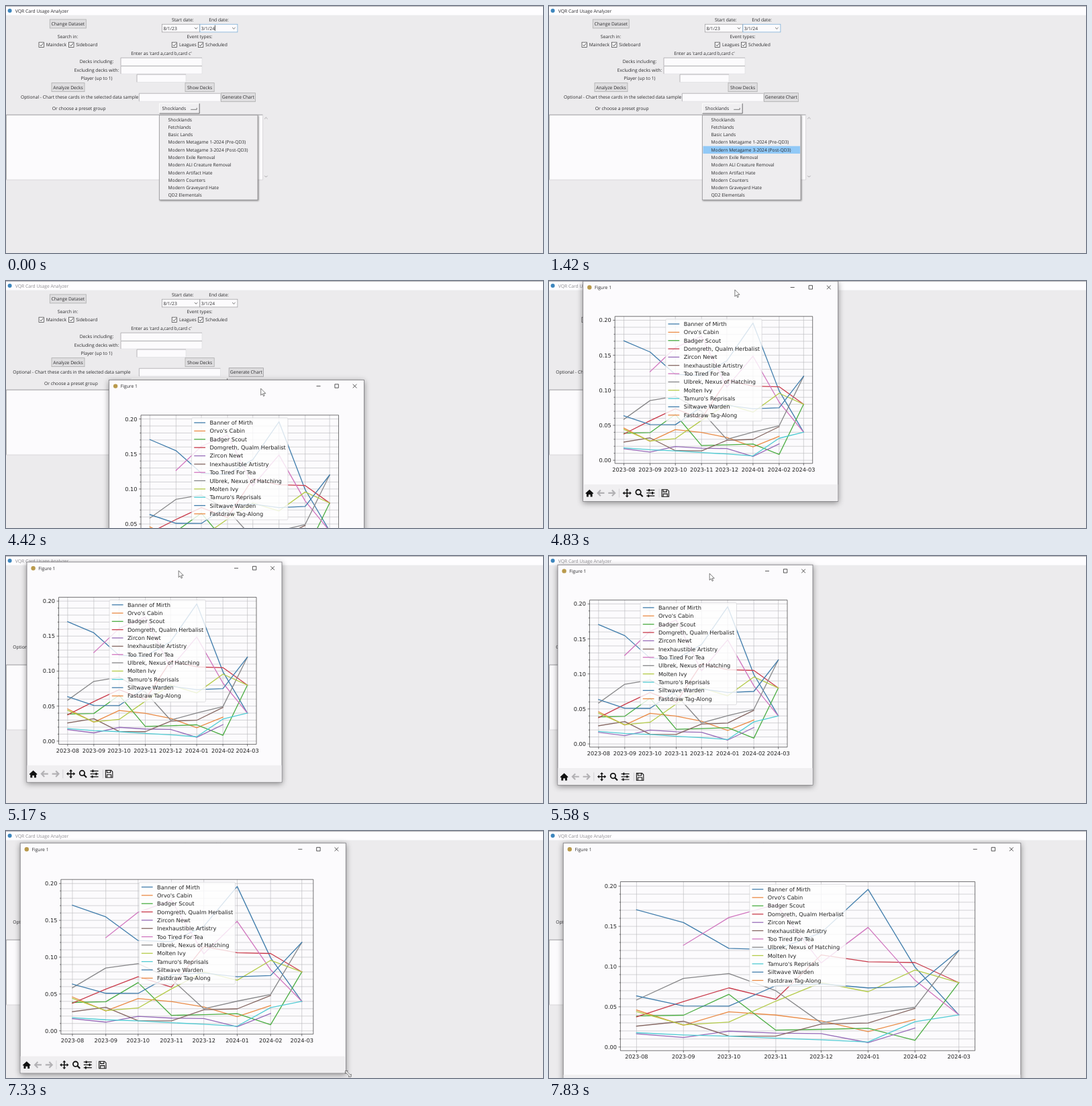
An HTML page that plays this animation: 800 px wide and 368 px high, repeating every 8000 ms.

```html
<!DOCTYPE html>
<html lang="en">
<head>
<meta charset="utf-8">
<title>Card usage chart demo</title>
<style>
html, body { margin: 0; width: 800px; height: 368px; overflow: hidden; background: #ecebed; }
svg { display: block; }
text { font: 6.74px "Open Sans", "Noto Sans", sans-serif; fill: #2a2a2c; text-rendering: geometricPrecision; }
.plot text { font: 8.24px "DejaVu Sans", sans-serif; fill: #222; }
.frame { filter: drop-shadow(0 2px 4px rgba(0, 0, 0, .42)); }
.menu { filter: drop-shadow(1.2px 1.2px .8px rgba(0, 0, 0, .45)); }
</style>
</head>
<body>
<svg id="stage" width="800" height="368" viewBox="0 0 800 368"></svg>
<script>
const LOOP = 8000, STEP = 1000 / 12;
const BG = '#ecebed', FIELD = '#fcfbfd';

function el(parent, tag, attrs = {}, content) {
  const node = document.createElementNS('http://www.w3.org/2000/svg', tag);
  set(node, attrs);
  if (content !== undefined) node.textContent = content;
  parent.append(node);
  return node;
}
function set(node, attrs) {
  for (const k in attrs) node.setAttribute(k, attrs[k]);
}
const group = (p, attrs) => el(p, 'g', attrs);
const show = (node, on) => set(node, { visibility: on ? 'visible' : 'hidden' });
const move = (node, x, y) => set(node, { transform: `translate(${x} ${y})` });
const rect = (p, x, y, width, height, fill, stroke = 'none', sw = 0.6) =>
  el(p, 'rect', { x, y, width, height, fill, stroke, 'stroke-width': sw });
const path = (p, d, stroke, sw = 0.7, fill = 'none') =>
  el(p, 'path', { d, stroke, 'stroke-width': sw, fill });
// Labels are placed by their vertical centre.
const label = (p, x, y, str, anchor = 'start') =>
  el(p, 'text', { x, y: y + 2.4, 'text-anchor': anchor }, str);
const mid = (p, x, y, str) => label(p, x, y, str, 'middle');

function button(p, x, y, w, h, str) {
  const box = rect(p, x, y, w, h, '#dfdee0', '#adadad', 0.8);
  mid(p, x + w / 2, y + h / 2, str);
  return box;
}
function entry(p, x, y, w, h) {
  rect(p, x, y, w, h, FIELD, '#dddcdf');
  path(p, `M${x} ${y + h}V${y}H${x + w}`, '#a9a8ab');
}
function check(p, x, y, str) {
  rect(p, x, y, 7.4, 7.4, FIELD, '#333', 0.7);
  path(p, `M${x + 1.5} ${y + 3.7}l1.7 1.8 3-3.8`, '#222', 0.8);
  label(p, x + 10.7, y + 3.7, str);
}
function combo(p, x, str) {
  const box = rect(p, x, 27.2, 56, 11.7, FIELD, '#9a999c', 0.7);
  label(p, x + 1.8, 33.1, str);
  path(p, `M${x + 48.3} 32l2.2 2.2 2.2-2.2`, '#444', 0.8);
  return box;
}
function optionMenu(p, x, w, str) {
  rect(p, x, 145.3, w, 14.8, '#f0eff1');
  path(p, `M${x} 160V145.3H${x + w}`, '#fff', 0.9);
  path(p, `M${x} 160.1H${x + w}V145.3`, '#5c5c5e', 0.9);
  label(p, x + 4, 152.8, str);
  rect(p, x + w - 13, 151.8, 9, 2.4, '#f6f5f7');
  path(p, `M${x + w - 13} 154.2h9v-2.4`, '#555', 0.8);
}

const stage = document.getElementById('stage');
rect(stage, 0, 0, 800, 368, BG);

// ---- Main window ----
const app = group(stage);
rect(app, 0, 0, 800, 13.6, '#fefdff');
path(app, 'M0 .3H800', '#77767a', 0.7);
el(app, 'circle', { cx: 5.6, cy: 7, r: 3, fill: '#3d86bd' });
const title = label(app, 13.8, 7.3, 'VQR Card Usage Analyzer');

button(app, 65.3, 20, 54, 13, 'Change Dataset');
mid(app, 263.3, 20.6, 'Start date:');
mid(app, 317, 20.6, 'End date:');
combo(app, 232.6, '8/1/23');
const endDate = combo(app, 288.9, '3/1/24');
const caret = path(app, 'M311.4 28.6V37', '#111', 0.7);
mid(app, 92, 45.6, 'Search in:');
mid(app, 288.5, 45.6, 'Event types:');
check(app, 49, 54.1, 'Maindeck');
check(app, 93.6, 54.1, 'Sideboard');
check(app, 247.2, 54.1, 'Leagues');
check(app, 286.4, 54.1, 'Scheduled');
mid(app, 231.5, 70.6, "Enter as 'card a,card b,card c'");
mid(app, 135, 82.9, 'Decks including:');
mid(app, 135, 95.4, 'Excluding decks with:');
mid(app, 135, 107.8, 'Player (up to 1)');
entry(app, 171, 77.2, 121, 11.6);
entry(app, 171, 89.6, 121, 11.4);
entry(app, 195, 102, 73, 11.3);
button(app, 68, 114.6, 49, 13, 'Analyze Decks');
button(app, 267, 114.6, 43.2, 13, 'Show Decks');

function chartRow(dx, buttonX, optX, optW, optText) {
  const g = group(app);
  label(g, 22 - dx, 136, 'Optional - Chart these cards in the selected data sample');
  entry(g, 198.4, 130.2, 121, 11.8);
  const btn = button(g, buttonX, 129.6, 51.2, 12.8, 'Generate Chart');
  mid(g, 108.7 - dx, 152.9, 'Or choose a preset group');
  optionMenu(g, optX, optW, optText);
  return { g, btn };
}
const before = chartRow(0, 320.3, 228.6, 59.6, 'Shocklands');
const after = chartRow(11.8, 332.2, 187.6, 142, 'Modern Metagame 1-2024 (Pre-QD3)');

rect(app, 0, 162, 382.6, 97, FIELD);
path(app, 'M0.3 259V162.2H382.6', '#858487', 0.8);
path(app, 'M0 259H382.6V162', '#d2d1d4', 0.8);
path(app, 'M385.2 168.2l2.2-2.2 2.2 2.2M385.2 252.8l2.2 2.2 2.2-2.2', '#98979a', 0.8);

// ---- Preset menu ----
const ROW = 11.27, ROW_TOP = 163.6;
const presets = ['Shocklands', 'Fetchlands', 'Basic Lands', 'Modern Metagame 1-2024 (Pre-QD3)',
  'Modern Metagame 3-2024 (Post-QD3)', 'Modern Exile Removal', 'Modern ALI Creature Removal',
  'Modern Artifact Hate', 'Modern Counters', 'Modern Graveyard Hate', 'QD2 Elementals'];
const menu = group(stage, { class: 'menu' });
rect(menu, 228.4, 162.7, 146.6, 126.2, '#eeedef', '#98979a', 0.8);
const hover = rect(stage, 229.5, 0, 144.6, ROW, '#91c9f7');
const rows = group(stage);
const rowTexts = presets.map((s, i) => label(rows, 241.5, ROW_TOP + ROW * (i + 0.5), s));
// [time, hovered row]
const hovers = [[330, 0], [420, 1], [580, 2], [750, 3], [920, 4], [1080, 5], [1170, 4],
  [1330, 3], [1420, 4], [1500, 5], [1830, 4], [2080, 3]];

// ---- Figure window ----
const blue = '#3f7cab', orange = '#ea8a44';
const series = [
  ['Banner of Mirth', blue, [.1706, .1547, .1226, .121, .142, .196, .0992, .04]],
  ["Orvo's Cabin", orange, [.046, .027, .0438, .0397, .0325, .0192, .0342]],
  ['Badger Scout', '#4bad42', [.0385, .0395, .0655, .021, .022, .0233, .0083, .08]],
  ['Domgreth, Qualm Herbalist', '#c93a4a', [.0375, .0565, .0735, .0593, .1145, .106, .105, .08]],
  ['Zircon Newt', '#966bb8', [.0165, .0118, .0197, .0173, .0167, .0055, .0235]],
  ['Inexhaustible Artistry', '#836560', [.026, .032, .0138, .0135, .0285, .0298, .048]],
  ['Too Tired For Tea', '#d074be', [null, .1265, .161, .177, .1045, .1487, .083, .04]],
  ['Ulbrek, Nexus of Hatching', '#868688', [.0585, .0853, .0913, .07, .03, .0403, .0493, .12]],
  ['Molten Ivy', '#b4cb48', [.044, .0275, .031, .057, .08, .0687, .0957, .08]],
  ["Tamuro's Reprisals", '#4fcbd3', [.0178, .015, .0135, .011, .009, .0063, .0315, .04]],
  ['Siltwave Warden', blue, [.0635, .051, .0508, .0762, .0785, .0735, .075, .12]],
  ['Fastdraw Tag-Along', orange, []]
];
const months = ['2023-08', '2023-09', '2023-10', '2023-11', '2023-12', '2024-01', '2024-02', '2024-03'];
const days = [0, 31, 61, 92, 122, 153, 184, 213];
const BAR = 18.3, TOOLS = 25.2, W0 = 380, H0 = 328;

const win = group(stage);
const frame = rect(win, 0, 0, W0, H0, FIELD, '#77767a', 0.8);
set(frame, { class: 'frame' });
el(win, 'circle', { cx: 9.6, cy: 9.2, r: 3.2, fill: '#b99a4c' });
label(win, 17.3, 9.3, 'Figure 1');
const controls = group(win);
path(controls, 'M-71 9.2h6M-43.6 6.4h5.4v5.4h-5.4zM-16.8 6.4l5.8 5.6M-11 6.4l-5.8 5.6', '#222', 0.75);

const plot = group(win, { class: 'plot' });
const grid = path(plot, '', '#b8b7ba', 0.6);
const lines = series.map(s => path(plot, '', s[1], 1.3));
lines.forEach(l => set(l, { 'stroke-linejoin': 'round', 'stroke-linecap': 'square' }));
const axes = path(plot, '', '#2c2c2e', 0.65);
const xLabels = months.map(m => el(plot, 'text', { 'text-anchor': 'middle' }, m));
const yLabels = [0, 1, 2, 3, 4].map(i =>
  el(plot, 'text', { 'text-anchor': 'end' }, (i * 0.05).toFixed(2)));
const legend = group(plot);
el(legend, 'rect', { x: -71.7, y: 0, width: 143.4, height: 152, rx: 1.7, fill: '#fff',
  'fill-opacity': 0.8, stroke: '#cccccf', 'stroke-width': 0.6 });
series.forEach(([name, color], i) => {
  const y = 7.3 + i * 12.34;
  path(legend, `M-68 ${y}h16.8`, color, 1.3);
  el(legend, 'text', { x: -44.8, y: y + 3 }, name);
});

const tools = group(win);
const toolsBg = rect(tools, 0.4, 0, W0 - 0.8, TOOLS - 0.4, '#f0eff1');
path(tools, 'M3.6 13.2l6-5.6 6 5.6-1.1 1-.6-.5v4.8h-2.9v-3.3H8.2v3.3H5.3v-4.8l-.6.5z', 'none', 0, '#111');
const arrowIcon = 'M5.2 0H-4.4M-.4-4.3L-4.7 0l4.3 4.3';
set(path(tools, arrowIcon, '#b2b1b4', 2.1), { transform: 'translate(26.6 12.8)' });
set(path(tools, arrowIcon, '#b2b1b4', 2.1), { transform: 'translate(42.8 12.8) scale(-1 1)' });
path(tools, 'M53.8 6.4v13M113.4 6.4v13', '#c9c8cb', 0.7);
const pan = group(tools, { transform: 'translate(65.6 12.8)' });
path(pan, 'M-5 0H5M0-5V5', '#111', 1.5);
for (let a = 0; a < 360; a += 90)
  set(path(pan, 'M0-6.6l2.5 2.8h-5z', 'none', 0, '#111'), { transform: `rotate(${a})` });
el(tools, 'circle', { cx: 82.4, cy: 11.6, r: 3.7, fill: 'none', stroke: '#111', 'stroke-width': 1.8 });
path(tools, 'M85 14.2l4 4', '#111', 2.2);
path(tools, 'M94.6 8.6h12M94.6 12.8h12M94.6 17h12', '#111', 1.2);
path(tools, 'M98.4 6.8v3.6M103.4 11v3.6M97.6 15.2v3.6', '#111', 2);
path(tools, 'M117.4 7.6h8.2l2.2 2.2v8.4h-10.4zM119.4 7.8v3.2h5.2V7.8M119.4 18v-4h6.2v4', '#111', 1.1);

let lastSize = '';
function layout(w, h) {
  if (lastSize === w + ',' + h) return;
  lastSize = w + ',' + h;
  const ch = h - BAR - TOOLS;
  const l = w * 0.125, r = w * 0.9, top = BAR + ch * 0.12, bot = BAR + ch * 0.89;
  const px = d => l + (r - l) * (0.5 + (d / 213 - 0.5) / 1.1);
  const py = v => bot - (v + 0.0045) / 0.21 * (bot - top);
  set(frame, { width: w, height: h });
  move(controls, w, 0);
  move(tools, 0, h - TOOLS);
  set(toolsBg, { width: w - 0.8 });
  let g = '', a = `M${l} ${top}H${r}V${bot}H${l}Z`;
  days.forEach((d, i) => {
    g += `M${px(d)} ${top}V${bot}`;
    a += `M${px(d)} ${bot}v2.9`;
    set(xLabels[i], { x: px(d), y: bot + 12.1 });
  });
  for (let i = 0; i <= 20; i++) {
    const y = py(i / 100);
    g += `M${l} ${y}H${r}`;
    a += `M${l} ${y}h${i % 5 ? -1.7 : -2.9}`;
    if (i % 5 === 0) set(yLabels[i / 5], { x: l - 5.4, y: y + 3 });
  }
  set(grid, { d: g });
  set(axes, { d: a });
  series.forEach((s, n) => {
    const pts = s[2].map((v, i) => v === null ? null : `${px(days[i])} ${py(v)}`).filter(Boolean);
    set(lines[n], { d: pts.length ? 'M' + pts.join('L') : '' });
  });
  move(legend, (l + r) / 2, top + 4);
}

// ---- Pointers ----
const arrow = group(stage);
path(arrow, 'M0 0V10l2.3-2.2 1.6 3.6 1.5-.7-1.5-3.5h3.2z', '#222', 0.6, '#fff');
const sizer = group(stage);
path(sizer, 'M-4.2-4.4h3.6l-1.2 1.2 4.9 4.9 1.2-1.2v3.9H.4l1.2-1.2-4.9-4.9-1.2 1.2z', '#222', 0.6, '#fff');

// ---- Motion ----
const clamp = v => Math.max(0, Math.min(1, v));
const part = (t, a, b) => clamp((t - a) / (b - a));
const smooth = p => p * p * (3 - 2 * p);
const mix = (a, b, p) => a + (b - a) * p;
function track(keys, t) {
  let i = 0;
  while (i < keys.length - 2 && t >= keys[i + 1][0]) i++;
  const [ta, xa, ya] = keys[i], [tb, xb, yb] = keys[i + 1];
  const p = part(t, ta, tb);
  return [mix(xa, xb, p), mix(ya, yb, p)];
}
const drag = [[4420, 153.5, 147.4], [4500, 145, 131], [4750, 62, 8], [4830, 50.7, 0.3],
  [5000, 38, 4], [5170, 31, 9], [5250, 28, 10], [5580, 13, 13.2], [5750, 21.2, 18]];

function render(t) {
  const open = t < 2250;
  show(before.g, open);
  show(after.g, !open);
  show(menu, open);

  const h = hovers.filter(k => t >= k[0]).pop();
  show(hover, h && t < 2500);
  if (h) set(hover, { y: ROW_TOP + ROW * h[1], opacity: 1 - part(t, 2250, 2500) });
  rowTexts.forEach((n, i) => {
    show(n, open || (i === 3 && t < 2500));
    set(n, { opacity: i === 3 ? 1 - part(t, 2250, 2500) : 1 });
  });

  const blinkOn = t < 170 || Math.floor((t - 170) / 530) % 2 === 1;
  show(caret, blinkOn && t < 3170);
  set(endDate, { stroke: t < 3170 ? '#6ea6d4' : '#9a999c' });
  const pressed = t >= 3000 && t < 3170, hot = t >= 2830 && t < 3500;
  set(after.btn, {
    fill: pressed ? '#cce4f7' : hot ? '#e3eff9' : '#dddcde',
    stroke: pressed ? '#005499' : hot ? '#2f86cf' : '#a3a2a5'
  });
  title.style.fill = t < 3500 ? '#2a2a2c' : '#8c8b8f';

  show(win, t >= 3500);
  const [x, y] = track(drag, t);
  const grow = smooth(part(t, 7000, 7830));
  const w = mix(W0, 681.6, grow), hgt = mix(H0, 370.4, grow);
  layout(w, hgt);
  const pop = part(t, 3420, 3670), s = mix(0.92, 1, pop);
  set(win, {
    transform: `translate(${x + w * (1 - s) / 2} ${y + hgt * (1 - s) / 2}) scale(${s})`,
    opacity: pop
  });
  plot.style.display = t >= 3580 ? '' : 'none';

  show(arrow, t >= 3670 && t < 6000);
  show(sizer, t >= 6000);
  if (t < 4420) move(arrow, ...track([[3670, 362, 148], [4080, 379.8, 160.2]], t));
  else if (t < 5750) move(arrow, x + 226.2, y + 12.8);
  else move(arrow, ...track([[5750, 247.4, 30.8], [6000, 403, 345]], t));
  const nudge = t < 6750 ? 0 : 1.7;
  move(sizer, x + w + 1.8 + nudge, y + hgt - 0.7 + nudge);
}

const begin = performance.now();
function tick() {
  const t = (performance.now() - begin) % LOOP;
  const k = Math.floor((t + 5) / STEP) % 96;
  render(Math.round(k * STEP / 10) * 10);
  requestAnimationFrame(tick);
}
render(0);
requestAnimationFrame(tick);
</script>
</body>
</html>
```
